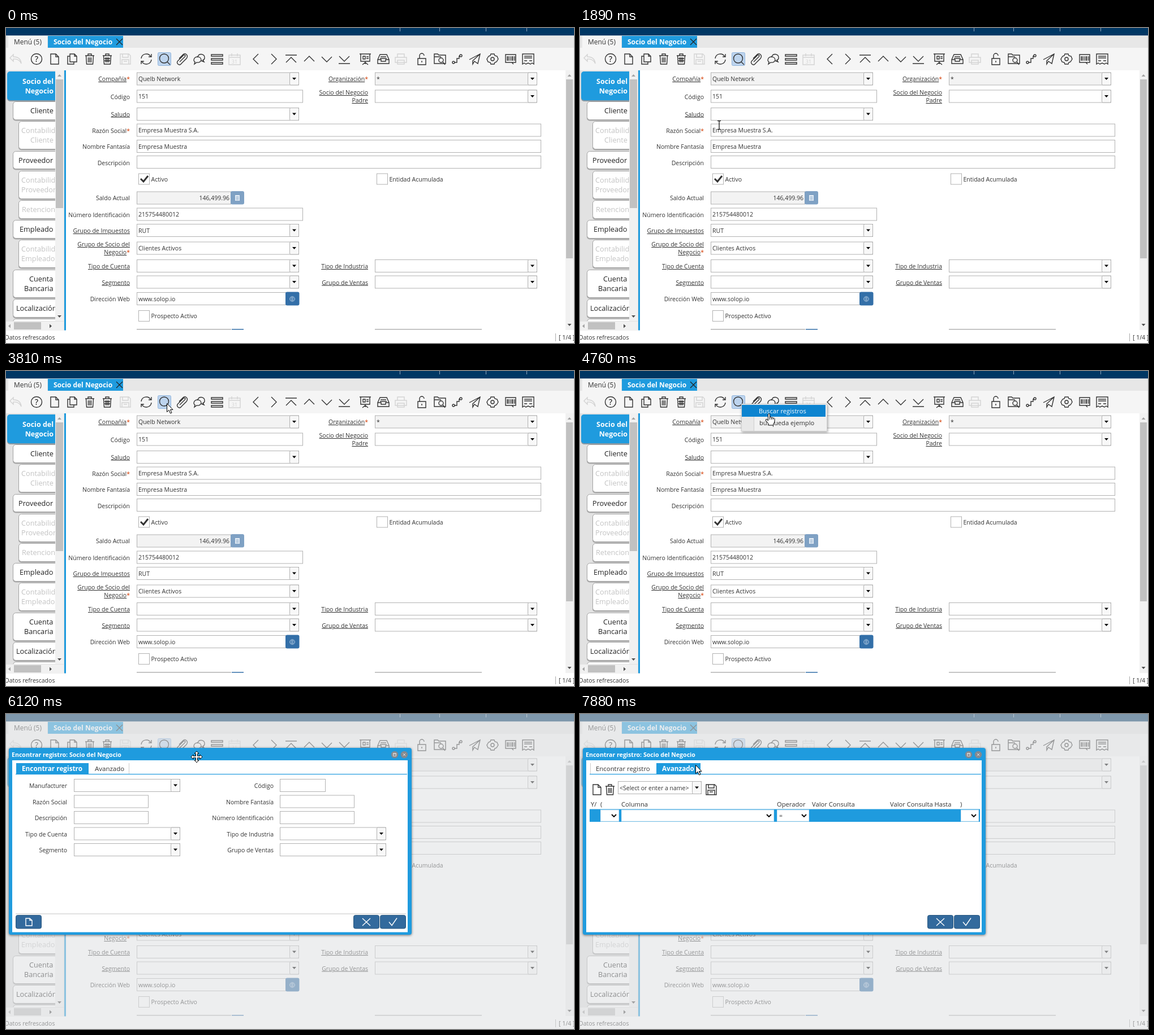
An HTML page for the animation above (8000 ms loop, 1004 px wide and 558 px high).

```html
<!DOCTYPE html>
<html lang="es">
<head>
<meta charset="utf-8">
<title>Socio del Negocio</title>
<style>
html, body { margin: 0; width: 100%; height: 100%; overflow: hidden; background: #fff; }
svg { display: block; }
text { font-family: "Open Sans", "Noto Sans", sans-serif; white-space: pre; }
.icon { fill: none; stroke: #333; stroke-width: 1.4; }
.icon text { fill: currentColor; stroke: none; }
.off { stroke: #d3d3d3; color: #d3d3d3; }
.white { stroke: #fff; }
</style>
</head>
<body>
<svg id="stage" width="1004" height="558" viewBox="0 0 1004 558"></svg>
<script>
const BLUE = '#1f9bde', BUTTON = '#336a9d', INK = '#333', LOOP = 8000;

// Drawing helpers
const rect = (x, y, w, h, fill, extra = '') =>
  `<rect x="${x}" y="${y}" width="${w}" height="${h}" fill="${fill}" ${extra}/>`;
const box = (x, y, w, h, fill = '#fff', stroke = '#b2b2b2', r = 0) =>
  rect(x + .5, y + .5, w - 1, h - 1, fill, `stroke="${stroke}" rx="${r}"`);
const path = (d, extra = '') => `<path d="${d}" ${extra}/>`;
const text = (x, y, s, size = 10.5, fill = INK, extra = '') =>
  `<text x="${x}" y="${y}" font-size="${size}" fill="${fill}" ${extra}>${s}</text>`;
const bold = (x, y, s, size, fill = '#fff', extra = '') =>
  text(x, y, s, size, fill, 'font-weight="700" ' + extra);
const group = (id, body, extra = '') => `<g id="${id}" ${extra}>${body}</g>`;
const triangle = (x, y, dx, dy, fill = '#505050') => dy
  ? path(`M${x - 3.5} ${y - dy * 2}h7l-3.5 ${dy * 4}z`, `fill="${fill}"`)
  : path(`M${x - dx * 2} ${y - 3.5}v7l${dx * 4} -3.5z`, `fill="${fill}"`);

const field = (x, y, w, value = '', fill) =>
  box(x, y, w, 23, fill) + text(x + 3, y + 15.5, value);
const combo = (x, y, w, value, fill) => field(x, y, w, value, fill) +
  box(x + w - 17, y, 17, 23, '#f8f8f8', '#b2b2b2', 2) + triangle(x + w - 8.5, y + 11.5, 0, 1, '#000');
const check = (x, y, caption) => box(x, y, 20, 20) + text(x + 22.5, y + 14, caption);

// "_" marks a linked caption, "*" a required one
const label = (x, y, s) => {
  const name = s.replace(/[_*]/g, '');
  const line = s[0] === '_' ? 'text-decoration="underline"' : '';
  const star = s.endsWith('*') ? '<tspan fill="#d33a00">*</tspan>' : '';
  return text(x, y, `<tspan ${line}>${name}</tspan>${star}`, 10.5, INK, 'text-anchor="end"');
};

const PAGE = 'M-7 -9H2L7 -4V9H-7ZM2 -9V-4H7';
const TRASH = 'M-8 -6H8M-3 -6V-9H3V-6M-6.5 -6L-5.5 9H5.5L6.5 -6M-2.5 -3V6M0 -3V6M2.5 -3V6';
const SAVE = 'M-9 -9H6L9 -6V9H-9ZM-5 -9V-3H5V-9M-6 9V1H6V9M-3 4H3';
const icon = (x, y, d, cls = '', more = '') =>
  `<g class="icon ${cls}" transform="translate(${x} ${y})">${path(d)}${more}</g>`;
const glyph = (y, s, size) => text(0, y, s, size, 'currentColor', 'text-anchor="middle"');

const toolbar = [
  [17, 'M-4 -8L-10 -2L-4 4V0Q6 -1 10 8Q9 -4 -4 -4Z', 'off'],
  [54, 'M-9.5 0a9.5 9.5 0 1 0 19 0a9.5 9.5 0 1 0 -19 0', '', glyph(5, '?', 14)],
  [86, PAGE],
  [117, 'M-4 -9H4L8 -5V5H-4ZM4 -9V-5H8M-4 -5H-8V9H3V5'],
  [148, TRASH],
  [179, TRASH + 'M-5 -1H5M-5 3H5'],
  [211, SAVE, 'off'],
  [248, 'M-9 -1A9 9 0 0 1 8 -4M9 -9V-4H4M9 1A9 9 0 0 1 -8 4M-9 9V4H-4'],
  [280, 'M-8.5 -1a8 8 0 1 0 16 0a8 8 0 1 0 -16 0M5 5L10 10'],
  [311, 'M-4 5L5 -4Q7 -6 5 -7T2 -6L-7 3Q-10 6 -7 9T-1 8L8 -1Q11 -5 8 -8T2 -8L-5 -1'],
  [342, 'M-3 -3C-3 -11 10 -10 9 -2Q9 1 6 2L8 5L3 3M-10 2C-10 -6 3 -6 3 2Q1 7 -5 6L-9 9L-8 5Q-10 4 -10 2Z'],
  [373, 'M-10 -8H10V-5H-10ZM-10 -1H10V2H-10ZM-10 6H10V9H-10Z'],
  [404, 'M-10 -7H10V10H-10ZM-10 -3H10M-5 -10V-5M5 -10V-5', 'off', glyph(7.5, '31', 9)],
  [442, 'M4 -9L-5 0L4 9'],
  [473, 'M-4 -9L5 0L-4 9'],
  [504, 'M-10 -7H10M-9 6L0 -3L9 6'],
  [536, 'M-9 4L0 -5L9 4'],
  [567, 'M-9 -4L0 5L9 -4'],
  [598, 'M-10 8H10M-9 -5L0 4L9 -5'],
  [635, 'M-10 -9H10M-8 -9V4H8V-9M0 4V9M-5 10L0 6L5 10M-4 -5H0V0H-4ZM2 -4H6M2 -1H6'],
  [667, 'M-10 1L-6 -8H6L10 1V8H-10ZM-10 1H-4V4H4V1H10M-5 -4H5M-6 -1H6'],
  [698, 'M-6 -3V-9H6V-3M-10 -3H10V6H-10ZM-6 2H6V9H-6Z', 'off'],
  [735, 'M-7 -1H7V10H-7ZM-4 -1V-6A4 4 0 0 1 4 -6M0 3V6'],
  [767, 'M-10 8V-9H-4L-2 -7H10V8ZM-10 -4H2M-2 2a4 4 0 1 0 8 0a4 4 0 1 0 -8 0M5 5L9 10'],
  [797, 'M-8 6a2 2 0 1 0 4 0a2 2 0 1 0 -4 0M5 -6a2 2 0 1 0 4 0a2 2 0 1 0 -4 0M-4 6H0V-1H4V-6'],
  [829, 'M-10 1L9 -9L5 8L-1 4L-4 9V3L9 -9'],
  [860, 'M-3 0a3 3 0 1 0 6 0a3 3 0 1 0 -6 0M-3 -9H3L4 -6L8 -5L10 0L7 5L4 6L3 9H-3L-4 6L-8 5L-10 0L-7 -5L-4 -6Z'],
  [892, 'M-9 -8H9V6H-9ZM-6 -5V3M-4 -5V3M-1 -5V3M2 -5V3M4 -5V3M7 -5V3M2 6L5 9'],
  [923, 'M-10 -9H10V9L7 7L4 9L0 7L-4 9L-7 7L-10 9ZM-7 -5H7M-7 -2H7M-7 3H-2M2 3H7'],
];

const header = rect(0, 0, 1004, 13.5, '#003764') +
  [696, 766, 848, 920].map(x => rect(x, 0, 1, 6, '#8fa6bb')).join('') +
  rect(0, 13.5, 1004, 21.5, '#e7e7e7') + rect(4, 14, 69, 21, '#f5f5f5') + rect(74, 14, 133, 21, BLUE) +
  text(14, 29, 'Menú (5)', 11.9) + bold(84, 28.5, 'Socio del Negocio', 12) +
  path('M195 19L206 30M206 19L195 30', 'stroke="#222" stroke-width="1.2"') +
  rect(0, 35, 1004, 40, '#f5f5f5') + box(268, 43, 24, 24, '#bdd4ee', '#91b5dc', 2) +
  toolbar.map(([x, ...rest]) => icon(x, 55, ...rest)).join('');

// Side tabs: indent, top, height, then caption lines as [x, text]
const sideTabs = [
  [12, 130, 33, [43, 'Cliente']],
  [22, 165, 50, [27, 'Contabilidad'], [43, 'Cliente']],
  [12, 218, 32, [22, 'Proveedor']],
  [22, 253, 50, [27, 'Contabilidad'], [27, 'Proveedor']],
  [22, 305, 33, [28, 'Retenciones']],
  [12, 340, 33, [24, 'Empleado']],
  [22, 375, 50, [27, 'Contabilidad'], [27, 'Empleado']],
  [12, 428, 50, [41, 'Cuenta'], [32, 'Bancaria']],
  [12, 480, 33, [18, 'Localización']],
  [12, 515, 33],
];
const sidebar = rect(0, 75, 103, 461, '#e2e2e2') +
  `<clipPath id="side"><rect y="75" width="87" height="444"/></clipPath><g clip-path="url(#side)">` +
  sideTabs.map(([x, y, h, ...lines]) => rect(x, y + 1.5, 100, h, '#aaa', 'rx="5"') +
    box(x, y, 100, h, '#fff', '#a2a2a2', 5) +
    lines.map(([tx, s], i) => text(tx, y + (lines.length > 1 ? 21 + 17 * i : 21), s, 12.7,
      x > 12 ? '#c3c3c3' : '#222')).join('')).join('') +
  rect(2, 79, 100, 51, '#8d9aa3', 'rx="5"') + rect(2, 77, 100, 51, BLUE, 'rx="5"') +
  bold(84, 99, 'Socio del', 12.5, '#fff', 'text-anchor="end"') +
  bold(84, 116, 'Negocio', 12.5, '#fff', 'text-anchor="end"') + '</g>' +
  rect(87, 75, 15, 444, '#f1f1f1') + rect(88, 91, 13, 228, '#c1c1c1') +
  triangle(94.5, 84, 0, -1, '#a3a3a3') + triangle(94.5, 511, 0, 1) +
  rect(0, 520, 102, 15, '#f1f1f1') + rect(14, 521, 48, 13, '#c1c1c1') +
  triangle(6, 528, -1, 0, '#a3a3a3') + triangle(79, 528, 1, 0) +
  rect(103, 75, 3, 461, BLUE);

const captions = [
  [219, 94, '_Compañía*'], [219, 125.5, 'Código'], [219, 156.5, '_Saludo'], [219, 185.5, 'Razón Social*'],
  [219, 214, 'Nombre Fantasía'], [219, 242.5, 'Descripción'], [219, 305, 'Saldo Actual'],
  [219, 334.5, 'Número Identificación'], [219, 363, '_Grupo de Impuestos'],
  [219, 387, '_Grupo de Socio del'], [219, 401, '_Negocio*'], [219, 426, '_Tipo de Cuenta'],
  [219, 454.5, '_Segmento'], [219, 484, 'Dirección Web'],
  [640, 94, '_Organización*'], [640, 118, '_Socio del Negocio'], [640, 132, '_Padre'],
  [640, 426, '_Tipo de Industria'], [640, 454.5, '_Grupo de Ventas'],
];
const combos = [
  [231, 78.5, 'Quelb Network', '#f3f3f3'], [652, 78.5, '*', '#f3f3f3'], [652, 109.5], [231, 141],
  [231, 347], [231, 378.5], [231, 410], [652, 410], [231, 438.5], [652, 438.5],
];
combos[4][2] = 'RUT';
combos[5][2] = 'Clientes Activos';

const form = rect(106, 75, 884, 460, '#fff') + captions.map(c => label(...c)).join('') +
  combos.map(([x, y, value, fill]) => combo(x, y, 287, value, fill)).join('') +
  field(231, 109.5, 294, '151') + field(231, 169.5, 715, 'Empresa Muestra S.A.') +
  field(231, 198, 715, 'Empresa Muestra') + field(231, 226, 715) +
  check(234, 257.5, 'Activo') + path('M238 267L243 272L251 262', 'fill="none" stroke="#333" stroke-width="3"') +
  check(655, 257.5, 'Entidad Acumulada') + check(234, 500, 'Prospecto Activo') +
  field(231, 289.5, 167, '', '#f3f3f3') + text(395, 305, '146,499.96', 10.5, INK, 'text-anchor="end"') +
  rect(397, 289, 24, 23.5, '#7fa1c4', 'rx="3"') + rect(405, 296, 8, 10, '#e6eef6') +
  path('M406.5 299H411.5M406.5 301.5H411.5M406.5 304H411.5', 'stroke="#7fa1c4"') +
  field(231, 318.5, 294, '215754480012') + field(231, 468, 264, 'www.solop.io') +
  rect(494, 467.5, 24.5, 24, '#336fa8', 'rx="3"') +
  path('M501.5 480a4.5 4.5 0 1 0 9 0a4.5 4.5 0 1 0 -9 0M501.5 480H510.5M506 475.5V484.5M503 477.5H509M503 482.5H509',
    'fill="none" stroke="#a9c3de" stroke-width=".8"') +
  rect(231, 533, 167, 1.5, '#b2b2b2') + rect(399, 533, 21, 1.5, '#336fa8') + rect(652, 533, 189, 1.5, '#b2b2b2') +
  rect(989, 75, 15, 460, '#f1f1f1') + rect(990, 91, 12, 317, '#c1c1c1') +
  triangle(996, 84, 0, -1, '#a3a3a3') + triangle(996, 526, 0, 1) +
  rect(0, 535.5, 1004, 23, '#fff') + rect(971, 541, 1, 14, '#aaa') +
  text(-2, 552, 'Datos refrescados') + text(977, 552, '[ 1/4 ]');

const menu = box(285, 58, 152, 49, '#f1f1f1', '#d0d0d0') + rect(286, 59, 21, 47, '#e8e8e8') +
  rect(307, 59, 1, 47, '#cfcfcf') + group('hover', rect(286, 60, 148, 21, '#0d84d0')) +
  group('entry', text(316, 74.5, 'Buscar registros', 11.2, 'currentColor')) + text(317, 96, 'búsqueda ejemplo', 11.2);

// Search dialog
const action = (x, d) => box(x, 356, 46, 24.5, BUTTON, '#28577f', 3) + icon(x + 23, 368.5, d, 'white');
const findRows = ['Manufacturer', 'Razón Social', 'Descripción', 'Tipo de Cuenta', 'Segmento'];
const findRight = ['Código', 'Nombre Fantasía', 'Número Identificación', 'Tipo de Industria', 'Grupo de Ventas'];
const findTab = rect(18, 87, 128, 20, BLUE) + bold(28, 101, 'Encontrar registro', 11.8) +
  path('M217.5 87V106', 'stroke="#ccc"') + text(157, 101, 'Avanzado', 11.5) +
  findRows.map((name, i) => {
    const y = 115 + 28.5 * i;
    const wide = i > 2;
    return label(108, y + 16, name) + label(473, y + 16, findRight[i]) +
      (wide || !i ? combo(120, y, 188) : field(120, y, 132)) +
      (wide ? combo(484, y, 188) : field(484, y, i ? 132 : 81));
  }).join('') +
  group('focus', box(120, 115, 172, 23, 'none', BLUE)) + group('caret', rect(123, 119, 1, 15, '#000')) +
  rect(17, 353.5, 690, 1, '#c4c4c4') + action(17, 'M-5 -6.5H2L6 -3V6.5H-5ZM2 -6.5V-3H6');

const select = (x, w, value = '') => box(x, 169.5, w, 21, '#fff', '#d5e6f2') + text(x + 4, 184, value) +
  path(`M${x + w - 13} 178l4 4l4 -4`, 'fill="none" stroke="#000" stroke-width="1.8"');
const advancedTab = path('M18.5 87V106', 'stroke="#ccc"') + text(28, 101, 'Encontrar registro', 11.4) +
  rect(135, 87, 78, 20, BLUE) + bold(145, 101, 'Avanzado', 11.7) +
  icon(30, 134, PAGE) + icon(53, 134, TRASH) + combo(67, 119, 148, '&lt;Select or enter a name&gt;') +
  icon(232, 134, SAVE) +
  [[19, 'Y/'], [36, '('], [73, 'Columna'], [348, 'Operador'], [410, 'Valor Consulta'],
    [548, 'Valor Consulta Hasta'], [672, ')']].map(([x, s]) => text(x, 164, s, 11.2)).join('') +
  rect(17, 168.5, 690, 22.5, BLUE) + select(36, 33) + select(73, 270) + select(348, 57, '=') + select(673, 32);

const dialog = rect(0, 0, 1004, 558, '#e0e1e3', 'opacity=".57"') +
  rect(5, 60, 712, 331, BLUE, 'rx="4" style="filter:drop-shadow(0 1px 2px #0008)"') +
  rect(11, 82, 699, 304.5, '#fff') + bold(10, 75.5, 'Encontrar registro: Socio del Negocio', 10.6) +
  [687, 704].map(x => `<circle cx="${x}" cy="72" r="6.2" fill="#85898f"/>`).join('') +
  path('M684.5 69.5h5v5h-5zM684.5 71h5M701.7 69.7l4.6 4.6M706.3 69.7l-4.6 4.6', 'fill="none" stroke="#ddd"') +
  rect(17, 106, 692, 1.2, BLUE) + group('find', findTab) + group('advanced', advancedTab) +
  action(614, 'M-7 -6.5L7 6.5M7 -6.5L-7 6.5') + action(661, 'M-7 0L-2 6L7 -7');

const outline = 'stroke="#000" stroke-linejoin="round"';
const MOVE = 'M0 -10L4 -6H1.5V-1.5H6V-4L10 0L6 4V1.5H1.5V6H4L0 10L-4 6H-1.5V1.5H-6V4L-10 0L-6 -4V-1.5H-1.5V-6H-4Z';
const cursors = {
  arrow: path('M.5 .5V15.5L4 12.2L6.5 18L9 17L6.5 11.5H11Z', `fill="#fff" ${outline}`),
  beam: path('M-3 -7.5H-1Q0 -7.5 0 -6.5V6.5Q0 7.5 -1 7.5H-3M3 -7.5H1Q0 -7.5 0 -6.5M3 7.5H1Q0 7.5 0 6.5',
    'fill="none" stroke="#000" stroke-width="1.2"'),
  hand: path('M-1.5 13V1.5Q0 -.5 1.5 1.5V7Q3 5.5 4.5 7.5Q6 6.5 7.2 8.5Q9 7.5 10 9.5V14Q9.5 17 8 18V21H-1V18.5L-5.5 12.5Q-6 9.5 -3.5 10.5Z' +
    'M1.5 7V11M4.5 7.5V11M7.2 8.5V11', `fill="#fff" ${outline}`),
  move: path(MOVE, `fill="#fff" ${outline}`),
};

const stage = document.getElementById('stage');
stage.innerHTML = header + sidebar + form +
  group('menu', menu, 'style="filter:drop-shadow(1px 2px 2px #0005)"') + group('dialog', dialog) +
  group('cursor', Object.entries(cursors).map(([id, shape]) => group(id, shape)).join(''));

// Pointer poses: [time, x, y, kind]
const glide = (start, end, steps, [x0, y0], [x1, y1], kind) =>
  Array.from({ length: steps }, (_, i) => {
    const k = (i + 1) / steps;
    return [start + (end - start) * i / (steps - 1), x0 + (x1 - x0) * k, y0 + (y1 - y0) * k, kind];
  });
const poses = [
  [0, -50, -50, 'arrow'],
  ...glide(480, 690, 4, [984, 537], [550, 333], 'arrow'),
  ...glide(1420, 1550, 3, [550, 333], [300, 205], 'arrow'),
  [1620, 246, 191, 'beam'],
  [1890, 246, 172, 'beam'],
  ...glide(1960, 2100, 3, [246, 172], [278, 82], 'arrow'),
  [2170, 284, 61, 'hand'],
  ...glide(2310, 2440, 3, [284, 61], [284, 57], 'hand'),
  [3810, 284, 57, 'arrow'],
  ...glide(4480, 4760, 5, [284, 57], [334, 75], 'hand'),
  ...glide(4830, 5040, 4, [334, 75], [337, 76], 'hand'),
  [5770, 337, 76, 'arrow'],
  [6040, 337, 76, 'move'],
  ...glide(6720, 6860, 3, [337, 76], [296, 80], 'move'),
  ...glide(6930, 7350, 7, [296, 80], [204, 90], 'arrow'),
];

const part = id => document.getElementById(id);
const show = (id, on) => { part(id).style.display = on ? '' : 'none'; };

function draw(t) {
  const within = (a, b) => t >= a && t < b;
  const [, x, y, kind] = poses.filter(p => p[0] <= t).pop();
  part('cursor').setAttribute('transform', `translate(${x} ${y})`);
  Object.keys(cursors).forEach(id => show(id, id === kind));
  show('menu', within(3880, 5640));
  show('hover', t >= 4550);
  part('entry').style.color = t >= 4550 ? '#fff' : INK;
  show('dialog', t >= 6120);
  show('find', t < 7650);
  show('advanced', t >= 7650);
  show('focus', within(6450, 7550));
  show('caret', within(6450, 6980));
}

const origin = performance.now();
function tick() {
  draw((performance.now() - origin) % LOOP);
  requestAnimationFrame(tick);
}
tick();
</script>
</body>
</html>
```
